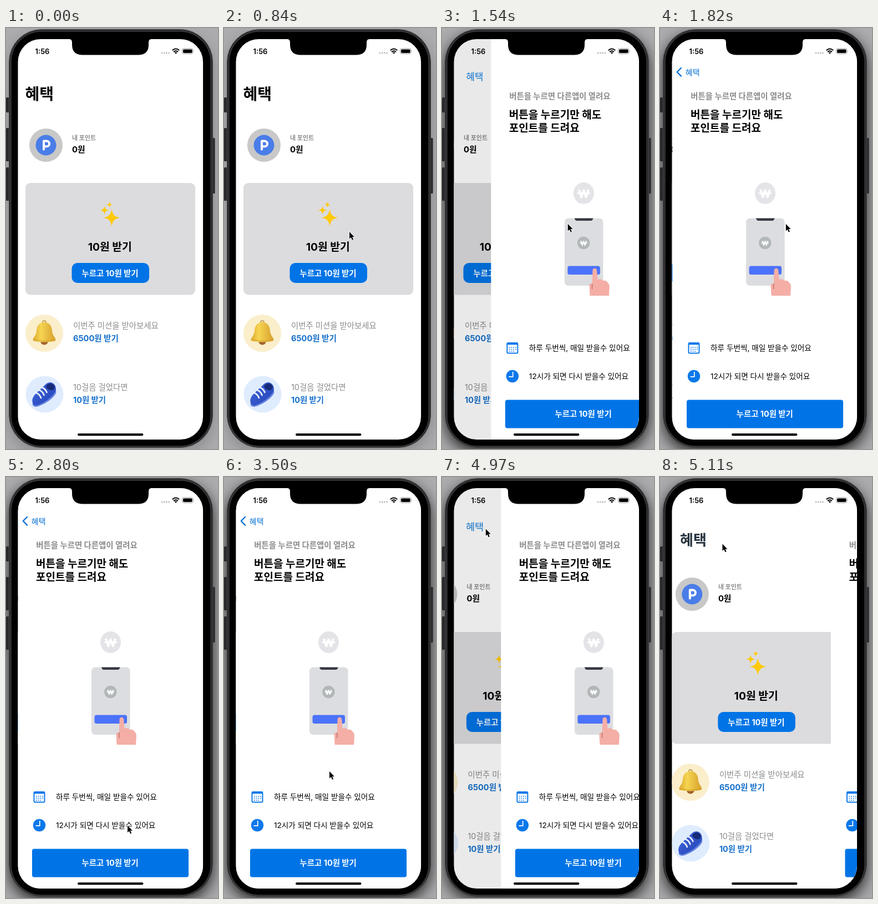
Write an HTML page that moves like this. It is 382x758 px and loops after 5.18 s.

```html
<!DOCTYPE html>
<html lang="ko">
<head>
<meta charset="utf-8">
<title>혜택</title>
<style>
html, body { margin: 0; width: 100%; height: 100%; overflow: hidden; background: #77777a; }
svg { display: block; width: 382px; height: 758px; }
text { font-family: Inter, 'Noto Sans CJK KR', 'Noto Sans CJK', sans-serif; }
.b { font-weight: 700; }
.gray { fill: #8b8b8e; }
.link { fill: #1670cb; }
.white { fill: #fff; }
</style>
</head>
<body>
<svg viewBox="0 0 382 758">
  <defs>
    <clipPath id="screen"><rect x="21.5" y="20" width="333.5" height="721" rx="41"/></clipPath>
    <filter id="blur" x="-20%" y="-20%" width="140%" height="140%"><feGaussianBlur stdDeviation="13"/></filter>
    <linearGradient id="gold"><stop stop-color="#dda82c"/><stop offset=".35" stop-color="#f6d552"/><stop offset="1" stop-color="#d79f2c"/></linearGradient>
    <linearGradient id="shoe" x2="1" y2="1"><stop stop-color="#4168dc"/><stop offset="1" stop-color="#2341b4"/></linearGradient>
    <path id="star" d="M0-1C.14-.3 .3-.14 1 0C.3 .14 .14 .3 0 1C-.14 .3-.3 .14-1 0C-.3-.14-.14-.3 0-1Z"/>
    <g id="won" fill="none" stroke="#fff">
      <path d="M-8.5-7L-4.3 6.5L0-5.5L4.3 6.5L8.5-7" stroke-width="4" stroke-linejoin="round"/>
      <path d="M-12-.5H12" stroke-width="2.6"/>
    </g>
  </defs>

  <rect width="382" height="758" fill="#acacae"/>
  <rect id="shadow" x="5" y="12" width="368" height="752" rx="58" filter="url(#blur)"/>
  <g fill="#29292b">
    <rect x="0" y="125" width="7" height="27" rx="1.5"/>
    <rect x="0" y="180" width="7" height="60" rx="1.5"/>
    <rect x="0" y="251" width="7" height="60" rx="1.5"/>
    <rect x="370" y="198" width="6.5" height="100" rx="1.5"/>
  </g>
  <rect x="5.5" y="2.5" width="367" height="753" rx="59" fill="#29292b" stroke="#4a4a4d"/>
  <rect x="9" y="6" width="360" height="747" rx="55" fill="#000" stroke="#3c3c3f" stroke-width="1.5"/>

  <g clip-path="url(#screen)">
    <rect x="21" y="20" width="335" height="721" fill="#fff"/>
    <g id="home">
      <circle cx="72" cy="211" r="30" fill="#c8c8c8"/>
      <circle cx="72" cy="211" r="18.5" fill="#4a7de8"/>
      <path d="M68 218.500V203.500H73.200A4.800 4.800 0 0 1 73.200 213.300H68" fill="none" stroke="#fff" stroke-width="4" stroke-linecap="round" stroke-linejoin="round"/>
      <text class="gray b" x="119" y="202" font-size="11">내 포인트</text>
      <text class="b" x="119" y="224" font-size="14.8">0원</text>

      <rect x="35" y="279" width="306" height="201.500" rx="9" fill="#dcdcde"/>
      <g fill="#ffc90c">
        <use href="#star" transform="translate(190.500 341.500) scale(15.500)"/>
        <use href="#star" transform="translate(177.500 328) scale(8)"/>
        <use href="#star" transform="translate(186.500 318) scale(5.500)"/>
      </g>
      <text class="b" x="187.300" y="401" font-size="19.3" text-anchor="middle">10원 받기</text>
      <rect x="118.500" y="423" width="139.500" height="36" rx="10" fill="#0074e6"/>
      <text class="b white" x="187.500" y="446.500" font-size="14.4" text-anchor="middle">누르고 10원 받기</text>

      <ellipse cx="69" cy="549.500" rx="34" ry="33.500" fill="#faeecb"/>
      <circle cx="69" cy="530" r="3" fill="none" stroke="#c8a55a" stroke-width="2"/>
      <circle cx="69" cy="563.500" r="7" fill="#a2642b"/>
      <path d="M69 530C60 530 55.500 536 55 545C54.500 554 48.500 557 48.500 562C49 566.500 89 566.500 89.500 562C89.500 557 83.500 554 83 545C82.500 536 78 530 69 530Z" fill="url(#gold)"/>
      <path d="M50 561Q69 566 88 561" fill="none" stroke="#cf9c2c"/>
      <text class="gray" x="121" y="541" font-size="14.4">이번주 미션을 받아보세요</text>
      <text class="b link" x="121" y="564" font-size="14.6">6500원 받기</text>

      <ellipse cx="69.500" cy="659.500" rx="34" ry="33" fill="#dfecfe"/>
      <path d="M49 674C46 678 49 682.500 55 682C68 679 88 666 90.500 656L89 648L60 674Z" fill="#6584e0"/>
      <path d="M48 675C46 669 49 663 54 658L69 644C73 639 78 637 82 638.500C88 640 91 647 89.500 653C85 664 66 677 55 679.500C51 680 49 678 48 675Z" fill="url(#shoe)"/>
      <path d="M72 645C75 640 80 639 84 641C88 643 88.500 648 86 651C81 654 74 651 72 645Z" fill="#172b78"/>
      <path d="M54.500 657Q60.500 659 63 666M60 652Q66 654 68.500 661M65.500 647.500Q71 650 73.500 656" fill="none" stroke="#f2f5ff" stroke-width="2.700" stroke-linecap="round"/>
      <text class="gray" x="121" y="652" font-size="14.4">10걸음 걸었다면</text>
      <text class="b link" x="121" y="675" font-size="14.4">10원 받기</text>
    </g>
    <rect id="dim" x="21" y="20" width="335" height="721"/>

    <g id="detail">
      <rect x="21.500" y="20" width="334" height="721" fill="#fff"/>
      <text class="gray b" x="54.300" y="128" font-size="14.4">버튼을 누르면 다른앱이 열려요</text>
      <text class="b" x="54" y="162.500" font-size="19">버튼을 누르기만 해도</text>
      <text class="b" x="54" y="187" font-size="19">포인트를 드려요</text>

      <ellipse cx="188.500" cy="297.500" rx="18.500" ry="19.500" fill="#e4e4e8"/>
      <use href="#won" x="188.500" y="298"/>
      <rect x="154" y="342.500" width="69.500" height="121.500" rx="7" fill="#dcdde0"/>
      <path d="M172 342.500H205.500Q204.500 347 201 347H176.500Q173 347 172 342.500Z" fill="#383842"/>
      <circle cx="188.300" cy="387" r="11.200" fill="#b2b7b8"/>
      <use href="#won" transform="translate(188.300 387.300) scale(.57)"/>
      <rect x="159.500" y="428.500" width="58.500" height="15.500" rx="3.500" fill="#4b72fb"/>
      <path d="M203.500 470L204.500 437C204.500 431 212 431 212.300 437L213.500 453C217 451 221 452 223 455C228 454 231 456 232 459C235 461 235 464 234.800 468L234 482H199.500L198.500 464C198.500 460 202 459 203.700 461Z" fill="#f4aea6"/>
      <path d="M203.700 460V470" stroke="#b56d69" stroke-width="1.300"/>

      <g fill="none" stroke="#0b78ea" stroke-width="2">
        <rect x="50.500" y="567" width="19" height="18.500" rx="2"/>
        <path d="M50 568.500H70" stroke-width="3.500"/>
        <path d="M54 575H68M54 578.500H68M54 582H64" stroke-dasharray="1.800 1.900" stroke-width="1.600"/>
      </g>
      <circle cx="60" cy="627" r="11.200" fill="#0b78ea"/>
      <path d="M60.800 619V627.800H53.500" fill="none" stroke="#fff" stroke-width="1.700"/>
      <text x="90" y="581" font-size="13.6">하루 두번씩, 매일 받을수 있어요</text>
      <text x="90" y="632" font-size="13.6">12시가 되면 다시 받을수 있어요</text>
      <rect x="47" y="669.500" width="282" height="51" rx="4" fill="#0074e6"/>
      <text class="b white" x="187.700" y="700" font-size="14.4" text-anchor="middle">누르고 10원 받기</text>
    </g>

    <g id="title">
      <text id="large" class="b" font-size="28">혜택</text>
      <text id="back" font-size="28" fill="#0b74d6">혜택</text>
    </g>
    <path id="chevron" d="M38 72L30.800 79.300L38 86.600" fill="none" stroke="#0b74d6" stroke-width="2.300" stroke-linecap="round" stroke-linejoin="round"/>
  </g>

  <path d="M114 19V20Q119 20 119 26V30Q119 48.500 138 48.500H238Q257 48.500 257 30V26Q257 20 262 20V19Z"/>
  <text x="52.500" y="46.500" font-size="13" font-weight="600">1:56</text>
  <g fill="#b9b9bb">
    <circle cx="281" cy="45" r="1.400"/><circle cx="285.200" cy="45" r="1.400"/>
    <circle cx="289.400" cy="45" r="1.400"/><circle cx="293.600" cy="45" r="1.400"/>
  </g>
  <path d="M299.800 40.300Q306 34.700 312.200 40.300M302 43Q306 39.400 310 43" fill="none" stroke="#000" stroke-width="2"/>
  <path d="M303.600 44.300Q306 42.600 308.400 44.300L306 46.800Z"/>
  <rect x="317.500" y="37" width="19.500" height="9.500" rx="3" fill="none" stroke="#999"/>
  <rect x="319" y="38.500" width="16.500" height="6.500" rx="1.700"/>
  <path d="M338.300 40V43.500Q339.500 41.800 338.300 40Z" fill="#999"/>
  <rect x="129" y="730" width="118.500" height="4.200" rx="2.100"/>
  <path id="cursor" d="M0 0V12.600L2.900 10L5 14.800L7.100 13.900L5 9.200H8.900Z" stroke="#fff" stroke-width="1.600" paint-order="stroke"/>
</svg>
<script>
const LOOP = 5180, STEP = 70, WIDTH = 333.5;
const FOCUS = 1260, PUSH = 1371, POP = 4915;
// time, x, y of the pointer tip
const pointer = [
  [350, 200, 734], [490, 212, 640], [630, 231, 500], [770, 228, 395], [840, 226, 367], [980, 226.8, 352.8],
  [2310, 226.8, 352.8], [2450, 224, 385], [2590, 217, 480], [2730, 217, 590], [2800, 219, 627.5], [2940, 222, 664],
  [3150, 229, 704], [3220, 229, 704], [3360, 222, 670], [3500, 190, 530], [3640, 150, 380], [3780, 129, 288],
  [3920, 108, 208], [4060, 92, 145], [4200, 80, 107], [4270, 74, 93.5], [4340, 64, 82], [4480, 55, 73],
  [4620, 55, 73], [4690, 57, 74], [4830, 57, 74], [4900, 62, 80], [5110, 112.5, 120.5]
];
const $ = id => document.getElementById(id);
const set = (id, name, value) => $(id).setAttribute(name, value);
const lerp = (a, b, k) => a + (b - a) * k;
const clamp = v => Math.min(1, Math.max(0, v));
const smooth = v => v * v * (3 - 2 * v);

// critically damped spring
function spring(ms) {
  const x = Math.max(0, ms) * 0.0177;
  return 1 - (1 + x) * Math.exp(-x);
}

function pointerAt(t) {
  const i = pointer.findIndex(key => key[0] >= t);
  if (i < 0) return pointer[pointer.length - 1].slice(1);
  const b = pointer[i], a = pointer[Math.max(0, i - 1)];
  const k = (t - a[0]) / (b[0] - a[0] || 1);
  return [lerp(a[1], b[1], k), lerp(a[2], b[2], k)];
}

function render(t) {
  const p = spring(t - PUSH) - spring(t - POP);
  set('shadow', 'opacity', t < FOCUS ? 0.2 : 0.75);
  set('home', 'transform', `translate(${-0.3 * WIDTH * p})`);
  set('dim', 'opacity', 0.09 * smooth(clamp((p - 0.1) / 0.8)));
  set('detail', 'transform', `translate(${WIDTH * (1 - p)})`);

  const size = lerp(1, 0.5, p);
  set('title', 'transform', `translate(${lerp(34.5, 45.8, p)} ${lerp(118.7, 79.3, p) + 10.6 * size}) scale(${size})`);
  set('large', 'opacity', clamp(1 - 1.2 * p));
  set('back', 'opacity', clamp(1.2 * p));
  set('chevron', 'opacity', clamp((p - 0.85) / 0.13));

  const [x, y] = pointerAt(t);
  set('cursor', 'transform', `translate(${x} ${y})`);
  set('cursor', 'visibility', t < pointer[0][0] ? 'hidden' : 'visible');
}

const start = performance.now();
function tick(now) {
  const t = Math.max(0, now - start) % LOOP;
  render(Math.floor(t / STEP) * STEP);
  requestAnimationFrame(tick);
}
render(0);
requestAnimationFrame(tick);
</script>
</body>
</html>
```
